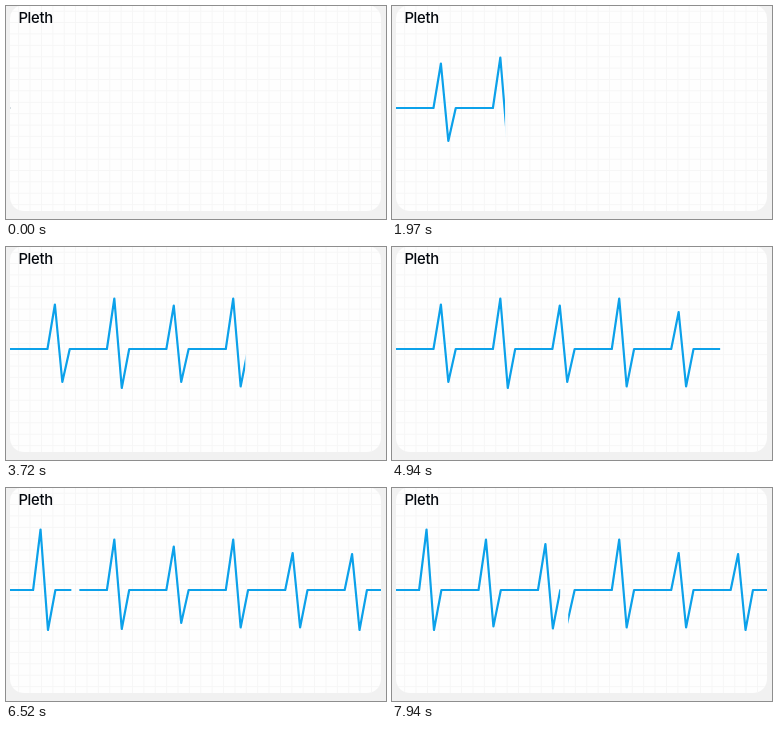
An HTML page that plays this animation: 380x213 px, repeating every 8 s.

```html
<!DOCTYPE html>
<html lang="en">
<head>
<meta charset="utf-8">
<title>Pleth</title>
<style>
  html, body { margin: 0; width: 100%; height: 100%; overflow: hidden; background: #f1f1f1; }
  svg { display: block; width: 100%; height: 100%; }
  polyline { fill: none; stroke: #0ca1ea; stroke-width: 2.2; stroke-linejoin: round; }
  text { font: 500 14.8px Inter, sans-serif; letter-spacing: -0.02em; fill: #04080e; }
</style>
</head>
<body>
<svg viewBox="0 0 380 213">
  <defs>
    <clipPath id="card"><rect x="4" y="-1" width="371" height="206" rx="14"/></clipPath>
    <clipPath id="oldClip"><rect id="oldWindow" height="213"/></clipPath>
    <clipPath id="newClip"><rect id="newWindow" height="213"/></clipPath>
  </defs>
  <g clip-path="url(#card)">
    <rect width="380" height="213" fill="#fefefe"/>
    <path id="grid" stroke="#f6f6f6" fill="none"/>
    <rect id="dot" x="4" y="101" width="1" height="2" fill="#d5dde2"/>
    <g clip-path="url(#oldClip)"><polyline id="oldTrace"/></g>
    <g clip-path="url(#newClip)"><polyline id="newTrace" transform="translate(-371)"/></g>
    <text x="12.4" y="16.5">Pleth</text>
  </g>
</svg>
<script>
const LOOP = 8000, DELAY = 515, TICK = 65;
const LEFT = 4, RIGHT = 375, BASE = 102;
const POINT = 7.43, BEAT = POINT * 8, FIRST_PEAK = 48.9;
const HEAD_START = 10.25, STEP = 4.675, GAP = 8;

// Height of each successive peak and depth of each trough.
const rises = [44.5, 50.5, 43.5, 50.5, 37, 36, 60.5, 50.5, 46];
const drops = [33, 39, 33, 37.5, 37.5, 40, 40, 36.5, 38.5];

const $ = id => document.getElementById(id);

// One continuous wave; its second sweep is the part beyond the right edge.
function wave() {
  const beats = rises.flatMap((rise, i) => {
    const x = FIRST_PEAK + i * BEAT;
    return [[x - POINT, BASE], [x, BASE - rise], [x + POINT, BASE + drops[i]], [x + 2 * POINT, BASE]];
  });
  return [[LEFT, BASE], ...beats, [2 * RIGHT, BASE]].join(' ');
}

function gridPath() {
  const cell = 11.38;
  let d = '';
  for (let x = 12.7; x < RIGHT; x += cell) d += `M${x} 0V205`;
  for (let y = 5.2; y < 205; y += cell) d += `M4 ${y}H375`;
  return d;
}

function setWindow(id, from, to) {
  $(id).setAttribute('x', from);
  $(id).setAttribute('width', Math.max(0, to - from));
}

function draw() {
  const step = Math.floor((performance.now() % LOOP - DELAY) / TICK);
  const travel = step < 0 ? LEFT : HEAD_START + step * STEP;
  const wrapped = travel > RIGHT;
  const head = wrapped ? travel - RIGHT : travel;
  $('dot').setAttribute('visibility', step < 0 ? 'visible' : 'hidden');
  setWindow('newWindow', LEFT, wrapped ? head : LEFT);
  setWindow('oldWindow', wrapped ? head + GAP : LEFT, wrapped ? RIGHT : head);
  requestAnimationFrame(draw);
}

$('grid').setAttribute('d', gridPath());
$('oldTrace').setAttribute('points', wave());
$('newTrace').setAttribute('points', wave());
draw();
</script>
</body>
</html>
```
